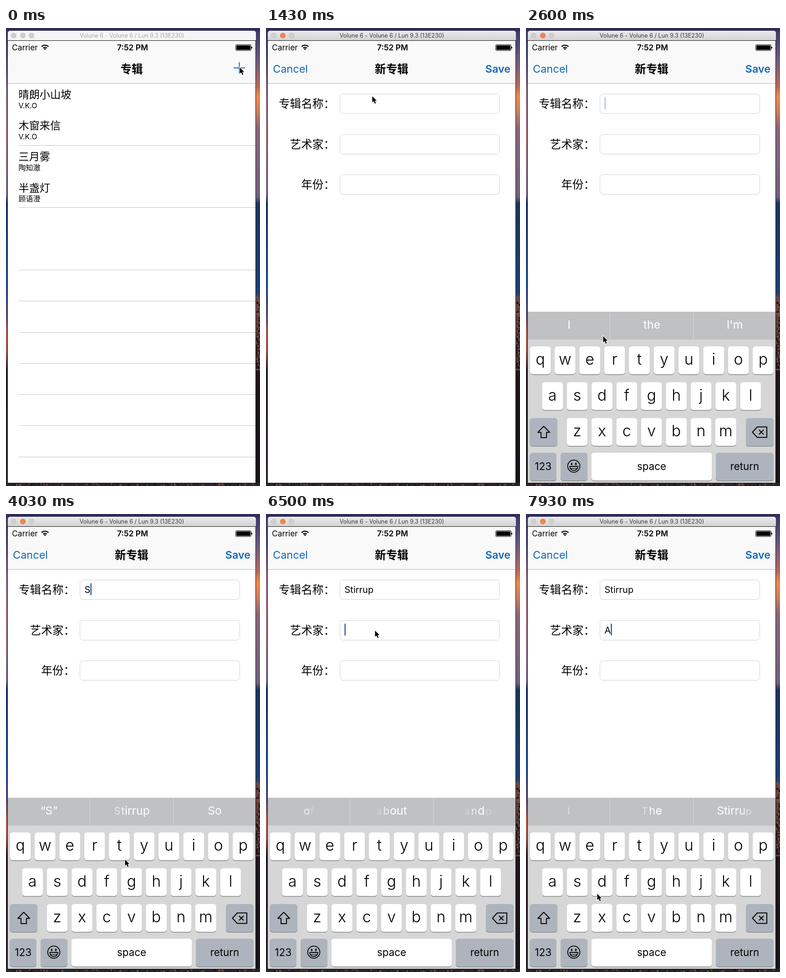
Recreate the animation shown at these times as an HTML page with a canvas. Size 558 by 1004 pixels, loop 8000 ms.

```html
<!DOCTYPE html>
<html lang="zh-CN">
<head>
<meta charset="utf-8">
<title>专辑</title>
<style>
html, body { margin: 0; width: 100%; height: 100%; overflow: hidden; }
canvas { display: block; width: 558px; height: 1004px; }
</style>
</head>
<body>
<canvas id="stage" width="558" height="1004"></canvas>
<script>
const c = document.getElementById('stage').getContext('2d');
const LOOP = 8000, STEP = 130;
const FONT = 'Inter, "Noto Sans CJK SC", "Noto Sans CJK", sans-serif';
const BLUE = '#1268b9';

const OPEN = 770, FOCUS = 1974, TYPE_S = 3760, PICK = 5460, NEXT = 6240, TYPE_A = 7860;
const SHIFTS = [[3120, TYPE_S], [7150, TYPE_A]];
const WORD = 'Stirrup';

const albums = [['晴朗小山坡', 'V.K.O'], ['木窗来信', 'V.K.O'], ['三月雾', '陶知澈'], ['半盏灯', '顾语澄']];

// start time, three words, slots whose letters fade from the right
const hints = [
  [0, ['I', 'the', "I'm"], ''],
  [3120, ['I', 'The', "I'm"], ''],
  [TYPE_S, ['“S”', WORD, 'So'], ''],
  [PICK, ['of', 'about', 'and'], ''],
  [6410, ['I', 'the', WORD], '0'],
  [7150, ['I', 'The', WORD], ''],
  [TYPE_A, ['“A”', 'And', 'All'], '2']
];

// pointer stops: time, x, y
const stops = [
  [910, 513, 86], [1430, 233, 149], [1820, 204, 162], [2340, 204, 162], [2600, 169, 675],
  [2990, 40, 888], [3250, 40, 888], [3640, 110, 806], [3770, 110, 806], [4030, 261, 757],
  [4420, 262, 745], [5200, 272, 678], [5460, 272, 664], [6240, 239, 255], [6500, 239, 255],
  [7020, 60, 846], [7150, 40, 884], [7280, 40, 884], [7670, 60, 808], [7800, 60, 808], [7930, 156, 832]
];

const clamp = v => Math.max(0, Math.min(1, v));
const smooth = v => v * v * (3 - 2 * v);

// remaining part of a critically damped slide
function slide(ms) {
  const x = Math.max(0, ms) * 0.018;
  return (1 + x) * Math.exp(-x);
}

function rect(x, y, w, h, color) {
  c.fillStyle = color;
  c.fillRect(x, y, w, h);
}

function round(x, y, w, h, r, fill, stroke) {
  c.beginPath();
  c.roundRect(x, y, w, h, r);
  if (fill) { c.fillStyle = fill; c.fill(); }
  if (stroke) { c.strokeStyle = stroke; c.lineWidth = 1; c.stroke(); }
}

function dot(x, y, r, fill) {
  c.beginPath();
  c.arc(x, y, r, 0, Math.PI * 2);
  c.fillStyle = fill;
  c.fill();
}

function poly(points, close = true) {
  c.beginPath();
  points.forEach(([x, y]) => c.lineTo(x, y));
  if (close) c.closePath();
}

function text(s, x, y, size, { color = '#000', weight = 400, align = 'left' } = {}) {
  c.font = `${weight} ${size}px ${FONT}`;
  c.fillStyle = color;
  c.textAlign = align;
  c.fillText(s, x, y);
}

function strip(x, w, colors) {
  const g = c.createLinearGradient(0, 0, 0, 1004);
  colors.forEach(([y, color]) => g.addColorStop(y / 1004, color));
  rect(x, 0, w, 1004, g);
}

function wallpaper() {
  strip(0, 279, [[0, '#35315f'], [60, '#4a4673'], [140, '#8a6f85'], [230, '#a5707a'], [365, '#7d6c8c'],
    [385, '#1a3266'], [560, '#214a8a'], [630, '#5b5078'], [670, '#b3614f'], [710, '#a0574c'],
    [750, '#261b26'], [1004, '#29242a']]);
  strip(279, 279, [[0, '#353768'], [70, '#6b5c80'], [125, '#b4685c'], [150, '#ee8748'], [180, '#d0805c'],
    [220, '#8b6577'], [370, '#71617e'], [385, '#1b355c'], [580, '#1c4078'], [595, '#6b4640'],
    [700, '#4a3130'], [750, '#1f171b'], [1004, '#171417']]);
  rect(0, 0, 558, 6, '#2f2d5a');
  rect(0, 997, 558, 7, '#2b2428');
  foliage();
}

// seeded leaves along the right and bottom edges
function foliage() {
  let seed = 7;
  const rnd = () => (seed = seed * 16807 % 2147483647) / 2147483647;
  const leaf = (x, y) => rect(x, y, 2 + rnd() * 2, 2 + rnd() * 3, rnd() < 0.5 ? '#7d4c44' : '#1c151a');
  for (let i = 0; i < 110; i++) leaf(549 + rnd() * 8, 588 + rnd() * 160);
  for (let i = 0; i < 90; i++) leaf(rnd() * 558, 998 + rnd() * 4);
}

function windowFrame(active) {
  const g = c.createLinearGradient(0, 6, 0, 27);
  g.addColorStop(0, active ? '#ebebeb' : '#f6f6f6');
  g.addColorStop(1, active ? '#d3d3d3' : '#f4f4f4');
  rect(3, 26, 546, 972, '#15151a');
  round(4, 6, 545, 22, [5, 5, 0, 0], g);
  [17, 37, 56].forEach((x, i) => {
    const hot = active && i === 1;
    dot(x, 16.5, 6, hot ? '#d8703c' : '#bfbfbf');
    dot(x, 16.5, 5.2, hot ? '#f28550' : '#cfcfcf');
  });
  text('Volune 6 - Volune 6 / Lun 9.3 (13E230)', 276.5, 21, 12.6,
    { color: active ? '#3c3c3c' : '#a9a9a9', align: 'center' });
  rect(4, 27, 545, 1, '#111');
}

function statusBar() {
  text('Carrier', 13, 49, 17.4);
  text('7:52 PM', 278, 49, 17.4, { weight: 600, align: 'center' });
  c.strokeStyle = '#000';
  c.lineWidth = 2.3;
  [5.6, 10.4].forEach(r => {
    c.beginPath();
    c.arc(85.7, 48, r, -Math.PI * 0.76, -Math.PI * 0.24);
    c.stroke();
  });
  c.beginPath();
  c.moveTo(85.7, 48.5);
  c.arc(85.7, 48, 3.2, -Math.PI * 0.76, -Math.PI * 0.24);
  c.fillStyle = '#000';
  c.fill();
  round(504.5, 36.5, 34, 13, 2.5, '#fff', '#000');
  round(506, 38, 31, 10, 1.5, '#000');
  round(539, 41, 2, 4, 1, '#000');
}

function navBar(title) {
  rect(4, 28, 544, 93, '#f9f9f9');
  rect(4, 121, 544, 1, '#b2b2b2');
  text(title, 276, 98.5, 24.6, { weight: 600, align: 'center' });
}

function albumList() {
  rect(4, 28, 544, 969, '#fff');
  navBar('专辑');
  rect(500, 86.5, 25, 2, BLUE);
  rect(511.5, 75, 2, 25, BLUE);
  albums.forEach(([name, artist], i) => {
    const y = i * 68.3;
    text(name, 27.5, 153.7 + y, 23.2);
    text(artist, 27.5, 175.5 + y, 16);
  });
  for (let i = 2; i <= 12; i++) {
    if (i === 3 || i === 5) continue;
    rect(28, Math.floor(120.65 + i * 68.3), 520, 1, '#c4c3c8');
  }
}

function form(t) {
  rect(4, 28, 544, 969, '#fff');
  navBar('新专辑');
  text('Cancel', 15, 98, 23.5, { color: BLUE });
  text('Save', 537, 98, 23.3, { color: BLUE, weight: 600, align: 'right' });
  const values = [t < TYPE_S ? '' : t < PICK ? 'S' : WORD, t < TYPE_A ? '' : 'A', ''];
  ['专辑名称：', '艺术家：', '年份：'].forEach((label, i) => {
    const y = i * 88.5;
    text(label, 151, 175.2 + y, 24.6, { align: 'right' });
    round(162.5, Math.round(145 + y) - 0.5, 351, 43, 7, '#fff', '#d0d0d0');
    text(values[i], 172.5, 173 + y, 20);
  });
  if (t >= FOCUS) caret(t, values);
}

function caret(t, values) {
  const row = t < NEXT ? 0 : 1;
  const since = Math.max(...[FOCUS, TYPE_S, PICK, NEXT, TYPE_A].filter(v => v <= t));
  const phase = (t - since) % 1000;
  c.font = `400 20px ${FONT}`;
  const gap = row === 0 && t >= PICK ? ' ' : '';
  c.globalAlpha = phase < 850 ? clamp((700 - phase) / 200) : (phase - 850) / 150;
  rect(172.5 + c.measureText(values[row] + gap).width, 152 + row * 88.5, 2.5, 26, '#2a5ca8');
  c.globalAlpha = 1;
}

function hintWord(word, cx, alphaAt) {
  c.font = `400 24.7px ${FONT}`;
  const start = cx - c.measureText(word).width / 2;
  const spots = [...word].map((ch, i) => [ch, start + c.measureText(word.slice(0, i)).width]);
  spots.forEach(([ch, x], i) => {
    const a = clamp(alphaAt(i, word.length));
    if (!a) return;
    c.globalAlpha = a;
    text(ch, x, 659, 24.7 * (0.75 + 0.25 * a), { color: '#fff' });
  });
  c.globalAlpha = 1;
}

function hintBar(t) {
  rect(4, 622, 544, 61, '#c0c1c3');
  rect(184, 622, 1, 61, '#d8d9da');
  rect(367, 622, 1, 61, '#d8d9da');
  const k = hints.filter(h => h[0] <= t).length - 1;
  const [start, words, fromRight] = hints[k];
  const q = (t - start) / 100;
  words.forEach((word, slot) => {
    const cx = 94.5 + slot * 182;
    const old = k ? hints[k - 1][1][slot] : word;
    if (old === word) return hintWord(word, cx, () => 1);
    const flip = fromRight.includes(slot);
    hintWord(old, cx, (i, n) => 1.2 + 0.4 * (flip ? n - 1 - i : i) - q);
    hintWord(word, cx, (i, n) => q - 0.6 - 0.25 * (n - 1 - i));
  });
}

function key(x, y, w, label, size, color = '#fff') {
  round(x, y + 1.5, w, 61, 6, '#86888b');
  round(x, y, w, 61, 6, color);
  if (!label) return;
  const big = size > 30;
  text(label, x + w / 2, y + (big ? 40 : 37.5), size, { weight: big ? 300 : 400, align: 'center' });
}

function smiley(x, y) {
  c.lineWidth = 1.8;
  c.beginPath();
  c.arc(x, y, 13.4, 0, Math.PI * 2);
  c.stroke();
  c.fillStyle = '#000';
  [-4.6, 4.6].forEach(dx => {
    c.beginPath();
    c.ellipse(x + dx, y - 5, 1.7, 2.7, 0, 0, Math.PI * 2);
    c.fill();
  });
  c.beginPath();
  c.moveTo(x - 9, y + 0.5);
  c.lineTo(x + 9, y + 0.5);
  c.bezierCurveTo(x + 8, y + 12.5, x - 8, y + 12.5, x - 9, y + 0.5);
  c.stroke();
  poly([[x - 7.5, y + 5], [x + 7.5, y + 5]], false);
  c.lineWidth = 1.2;
  c.stroke();
}

function keyIcons(shift) {
  c.strokeStyle = '#000';
  c.lineWidth = 2;
  c.lineJoin = 'round';
  poly([[39, 873], [52, 886.5], [45, 886.5], [45, 898], [33, 898], [33, 886.5], [26, 886.5]]);
  c.stroke();
  if (shift) { c.fillStyle = '#000'; c.fill(); }
  poly([[497.5, 886], [508, 874.5], [529, 874.5], [529, 897.5], [508, 897.5]]);
  c.stroke();
  poly([[512, 881], [522, 891]], false);
  c.stroke();
  poly([[522, 881], [512, 891]], false);
  c.stroke();
  smiley(105, 960.5);
}

function keyboard(t) {
  const grey = '#aeb4bd';
  const shift = SHIFTS.some(([a, b]) => t >= a && t < b);
  c.save();
  c.translate(0, Math.round(374 * slide(t - FOCUS)));
  rect(4, 683, 544, 314, '#d6d6d6');
  hintBar(t);
  [['qwertyuiop', 8.5, 698], ['asdfghjkl', 35.3, 776.5], ['zxcvbnm', 89.6, 855]].forEach(([row, x, y]) => {
    [...row].forEach((ch, i) => key(x + i * 54.4, y, 45.8, shift ? ch.toUpperCase() : ch, 34));
  });
  key(8.5, 855, 60.5, '', 0, shift ? '#fff' : grey);
  key(483, 855, 61, '', 0, grey);
  key(8.5, 931, 58.5, '123', 22.5, grey);
  key(76, 931, 59, '', 0, grey);
  key(143.5, 931, 265, 'space', 22.3);
  key(417, 931, 127, 'return', 22.3, grey);
  keyIcons(shift);
  c.restore();
}

function pointer(t) {
  let i = stops.findIndex(s => s[0] > t);
  if (i < 0) i = stops.length - 1;
  const b = stops[i], a = stops[i - 1] || b;
  const p = a === b ? 0 : smooth(clamp((t - a[0]) / (b[0] - a[0])));
  c.save();
  c.translate(a[1] + (b[1] - a[1]) * p, a[2] + (b[2] - a[2]) * p);
  poly([[0.5, 0.5], [0.5, 14], [3.6, 11.2], [6, 16.8], [8.4, 15.8], [6, 10.4], [10.3, 10.4]]);
  c.strokeStyle = '#fff';
  c.lineWidth = 2;
  c.lineJoin = 'miter';
  c.stroke();
  c.fillStyle = '#000';
  c.fill();
  c.restore();
}

function draw(t) {
  wallpaper();
  windowFrame(t >= 780);
  c.save();
  c.beginPath();
  c.rect(4, 28, 544, 969);
  c.clip();
  const drop = t < OPEN ? 969 : Math.round(969 * slide(t - OPEN));
  if (drop > 0) albumList();
  if (drop < 969) {
    c.save();
    c.translate(0, drop);
    form(t);
    c.restore();
  }
  if (t >= FOCUS) keyboard(t);
  statusBar();
  c.restore();
  pointer(t);
}

const begin = performance.now();
function tick() {
  const t = (performance.now() - begin) % LOOP;
  draw(Math.floor(t / STEP) * STEP);
  requestAnimationFrame(tick);
}
tick();
</script>
</body>
</html>
```
